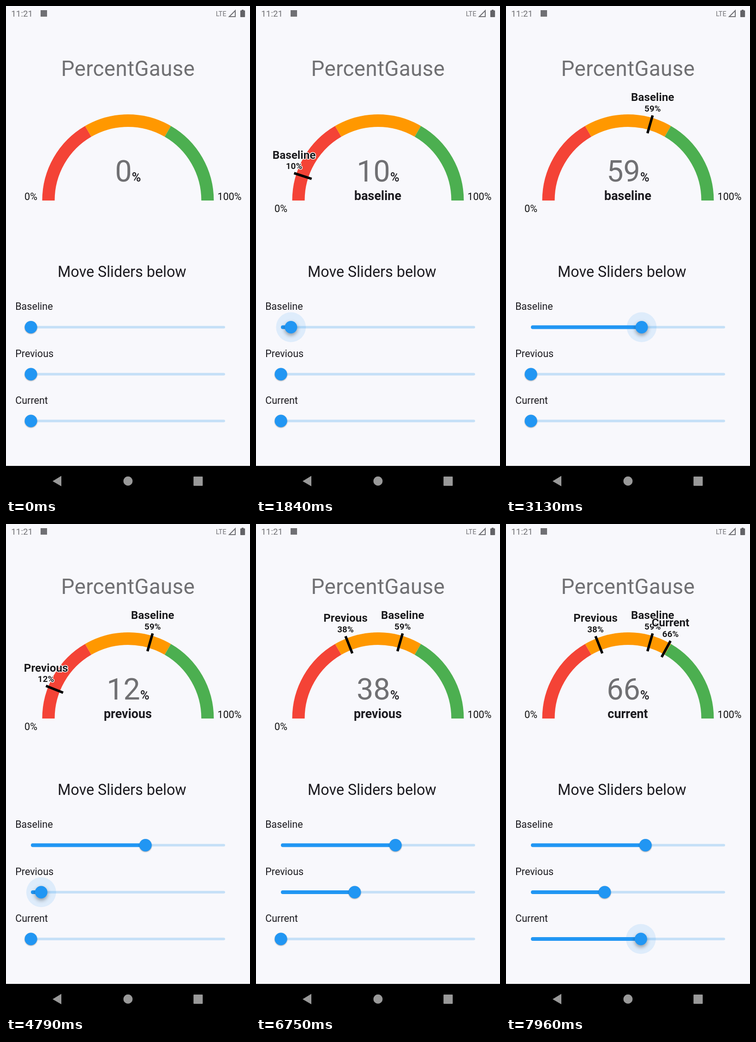
Recreate the animation shown at these times as an HTML page. Size 529 by 1058 pixels, loop 8 s.

```html
<!DOCTYPE html>
<html lang="en">
<head>
<meta charset="utf-8">
<title>Percent gauge</title>
<style>
  html, body { margin: 0; width: 100%; height: 100%; overflow: hidden; background: #f8f8fc; }
  svg { display: block; width: 100%; height: 100%; font-family: Roboto, sans-serif; }
  .mid { text-anchor: middle; }
  .arc { fill: none; stroke-width: 27; }
  .label { font-size: 21.55px; fill: #1c1b20; }
  .mark text { font-weight: 700; fill: #1b1b1f; stroke: #fff; stroke-width: 3px; stroke-linejoin: round; paint-order: stroke; text-anchor: middle; }
</style>
</head>
<body>
<svg id="stage" viewBox="0 0 529 1058">
  <rect width="529" height="1058" fill="#f8f8fc"/>

  <g fill="#707074">
    <text x="11.3" y="23" font-size="18.8">11:21</text>
    <rect x="75" y="9" width="14" height="14"/>
    <text x="455" y="22" font-size="14.5">LTE</text>
    <path d="M484 23H497V10Z" fill="none" stroke="#707074" stroke-width="2"/>
    <path d="M511 8h4v1.6h2.2q1 0 1 1V23q0 1-1 1H509q-1 0-1-1V10.600q0-1 1-1h2Z" fill="#636367"/>
  </g>

  <text class="mid" x="264.5" y="151" font-size="45.8" letter-spacing=".34" fill="#707073">PercentGause</text>

  <g id="arcs"></g>
  <text id="zero" class="mid" x="54" y="419" font-size="21.55" fill="#111">0%</text>
  <text class="mid" x="484.6" y="419" font-size="21.55" fill="#111">100%</text>
  <text class="mid" x="264.5" y="379"><tspan id="total" font-size="64.7" fill="#707073">0</tspan><tspan font-size="26.94" font-weight="500" fill="#1c1b20">%</tspan></text>
  <text id="kind" class="mid" x="264" y="418.5" font-size="26.94" font-weight="700" fill="#1c1b20"></text>
  <g id="marks"></g>

  <text x="112" y="585" font-size="32.33" fill="#1c1b20">Move Sliders below</text>
  <g id="sliders"></g>

  <rect y="993" width="529" height="65" fill="#000"/>
  <g fill="#999">
    <path d="M101 1026L120 1014.500V1037Z"/>
    <circle cx="264.500" cy="1025.700" r="10"/>
    <rect x="406.500" y="1016" width="20" height="20" rx="1"/>
  </g>
</svg>
<script>
const LOOP = 8000, LAG = 70;
const CX = 264.5, CY = 420;
const LEFT = 54, WIDTH = 421;

// keys: [ms, percent]; press and release drive the halo
const inputs = [
  { name: 'Baseline', y: 693.5, press: 1690, release: 3440,
    keys: [[1740, 0], [1770, 5.1], [1840, 10], [2400, 36], [3060, 57], [3130, 59]] },
  { name: 'Previous', y: 795, press: 4540, release: 5860,
    keys: [[4690, 0], [4720, 5.2], [4790, 12], [5200, 26], [5600, 36], [5760, 38]] },
  { name: 'Current', y: 896, press: 6800, release: 9000,
    keys: [[7080, 0], [7110, 5], [7170, 11], [7550, 29], [7890, 56.5], [7960, 66], [8000, 70]] }
];

const $ = id => document.getElementById(id);
const clamp = x => Math.max(0, Math.min(1, x));
const ease = x => x * x * (3 - 2 * x);

function add(parent, tag, attrs = {}, text = '') {
  const el = document.createElementNS('http://www.w3.org/2000/svg', tag);
  set(el, attrs);
  el.textContent = text;
  return parent.appendChild(el);
}

function set(el, attrs) {
  for (const k in attrs) el.setAttribute(k, attrs[k]);
}

function polar(percent, r) {
  const a = percent / 100 * Math.PI;
  return [CX - r * Math.cos(a), CY - r * Math.sin(a)];
}

function valueAt(keys, t) {
  if (t <= keys[0][0]) return 0;
  for (let i = 1; i < keys.length; i++) {
    const [t0, v0] = keys[i - 1], [t1, v1] = keys[i];
    if (t <= t1) return v0 + (v1 - v0) * (t - t0) / (t1 - t0);
  }
  return keys[keys.length - 1][1];
}

['#f44336', '#ff9800', '#4caf50'].forEach((stroke, i) => {
  const from = polar(i * 100 / 3, 172.5), to = polar((i + 1) * 100 / 3, 172.5);
  add($('arcs'), 'path', { class: 'arc', stroke, d: `M${from}A172.5 172.5 0 0 1 ${to}` });
});

for (const s of inputs) {
  s.mark = add($('marks'), 'g', { class: 'mark' });
  s.tick = add(s.mark, 'line', { stroke: '#000', 'stroke-width': 5.4 });
  s.title = add(s.mark, 'text', { 'font-size': 24.25 }, s.name);
  s.amount = add(s.mark, 'text', { 'font-size': 18.86 });

  const g = add($('sliders'), 'g');
  add(g, 'text', { class: 'label', x: 20.2, y: s.y - 37.5 }, s.name);
  add(g, 'rect', { x: LEFT, y: s.y - 2.7, width: WIDTH, height: 5.4, rx: 2.7, fill: '#c5e0f7' });
  s.fill = add(g, 'rect', { x: LEFT, y: s.y - 4, height: 8, rx: 4, fill: '#2196f3' });
  s.halo = add(g, 'circle', { cy: s.y, fill: '#2196f3', 'fill-opacity': .12 });
  s.thumb = add(g, 'circle', { cy: s.y, r: 13.5, fill: '#2196f3' });
}

function drawMark(s) {
  s.mark.style.display = s.value > 0 ? '' : 'none';
  const [x, y] = polar(s.value, 191.3), [x2, y2] = polar(s.value, 151.3);
  set(s.tick, { x1: x, y1: y, x2, y2 });
  set(s.title, { x, y: y - 31 });
  set(s.amount, { x, y: y - 8.5 });
  s.amount.textContent = s.value + '%';
}

function drawSlider(s, t) {
  const w = valueAt(s.keys, t - LAG) / 100 * WIDTH, x = LEFT + w;
  const held = ease(clamp((t - s.press) / 100)) * ease(clamp((s.release + 130 - t) / 130));
  set(s.fill, { width: w });
  set(s.halo, { cx: x, r: 32.3 * held });
  set(s.thumb, { cx: x });
  s.thumb.style.filter = `drop-shadow(0 ${1 + 3.5 * held}px ${1 + 3 * held}px rgba(0,0,0,.36))`;
}

function render(t) {
  let last = null;
  for (const s of inputs) {
    s.value = Math.round(valueAt(s.keys, t));
    if (s.value > 0) last = s;
    drawMark(s);
    drawSlider(s, t);
  }
  $('total').textContent = last ? last.value : 0;
  $('kind').textContent = last ? last.name.toLowerCase() : '';
  set($('zero'), { y: last && inputs[2].value < 10 ? 445 : 419 });
}

const start = performance.now();
function loop() {
  render((performance.now() - start) % LOOP);
  requestAnimationFrame(loop);
}
loop();
</script>
</body>
</html>
```
